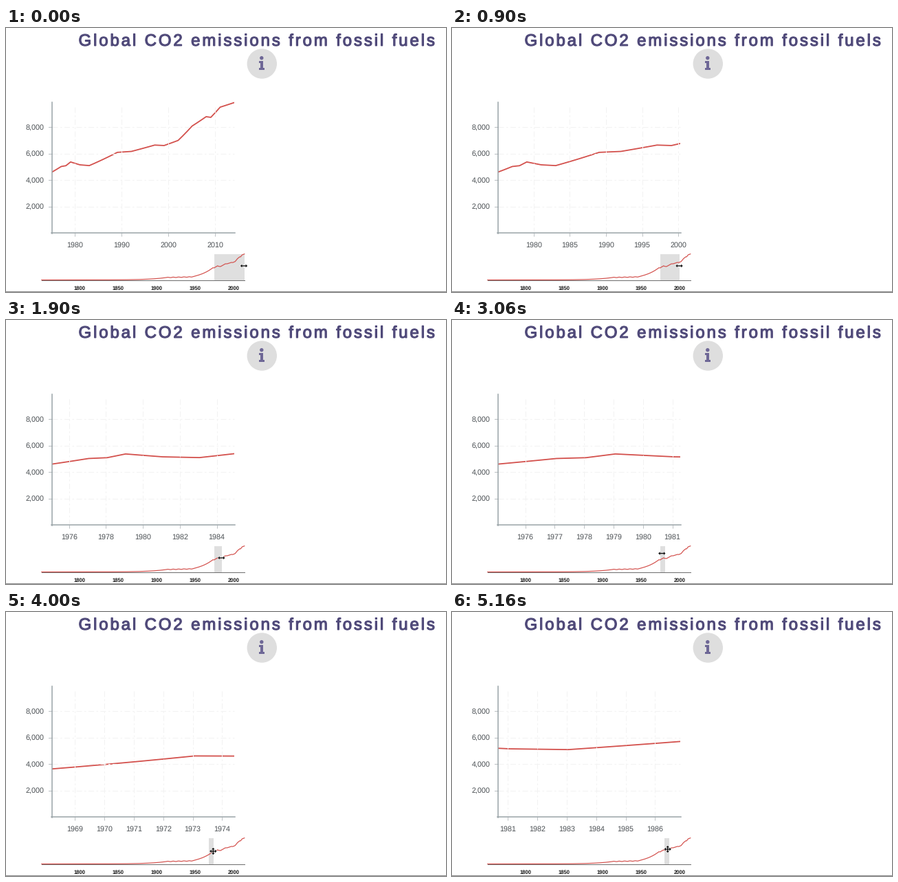
A matplotlib script for the animation above (5.18 s loop, 640x384 px).

```python
import numpy as np
import matplotlib.pyplot as plt
from matplotlib.animation import FuncAnimation
from matplotlib.collections import LineCollection
from matplotlib.patches import Circle, PathPatch, Polygon, Rectangle
from matplotlib.path import Path
from matplotlib.textpath import TextPath
from matplotlib.transforms import Affine2D

plt.rcParams["text.hinting"] = "none"

W, H, DPI = 640, 384, 100
STEP, FRAMES = 20, 259
PT = 72 / DPI  # points per pixel

FONT = "Liberation Sans"
PURPLE, INFO, RED = "#4f4979", "#6e6796", "#d3504c"
AXIS, TICK, GRID, LABEL = "#98a2a6", "#bcc1c4", "#f2f2f2", "#4a4f53"

LEFT, RIGHT, TOP, BASE = 66.8, 332.2, 108, 298.2
MINI_BASE, MINI_H = 366.5, 37.8

RESIZE_END, GRAB, TURN_BACK, END = 2140, 3350, 3980, 5160  # ms


def along(t, *keys):
    return np.interp(t, *zip(*keys))


def emissions(year):
    """Exponential growth between turning points, with interwar swings."""
    log_v = along(year, *((y, np.log(v)) for y, v in (
        (1751, 3), (1850, 54), (1913, 943), (1945, 1160), (1973, 4614),
        (1975, 4600), (1977, 5026), (1978, 5087), (1979, 5369), (1981, 5152),
        (1983, 5094), (1989, 6095), (1992, 6165), (1997, 6645), (1999, 6610),
        (2002, 6995), (2005, 8085), (2008, 8790), (2009, 8740), (2011, 9510),
        (2014, 9855))))
    swing = np.where((year > 1912) & (year < 1948), 80 * np.sin(0.9 * year), 0)
    return np.exp(log_v) + swing


calendar = np.arange(1751, 2015)
values = emissions(calendar)
years = calendar + 0.06


def value_y(v):
    return BASE - v * 0.01925


def mini_x(year):
    return 106.7 + (year - 1800) * 1.1215


def tick_step(span, count=5):
    raw = span / count
    step = 10 ** np.floor(np.log10(raw))
    err = step / raw
    for limit, factor in ((0.15, 10), (0.35, 5), (0.75, 2)):
        if err <= limit:
            return step * factor
    return step


def window(t):
    """Years at both ends of the brush: shrink, rest, then slide."""
    a = along(t, (GRAB, 1975.07), (TURN_BACK, 1968), (END, 1980.66))
    return a, a + along(t, (0, 39.03), (RESIZE_END, 6.2))


def pointer(t, x0, x1):
    if t < GRAB:
        handle = x1 - 0.8
        return (along(t, (2400, handle), (3000, 305.3), (3100, 305.3), (GRAB, x0 + 6)),
                along(t, (2400, 346), (3000, 339.5), (3100, 339.5), (GRAB, 348)))
    return (x0 + along(t, (TURN_BACK, 6), (END, 4.4)),
            along(t, (TURN_BACK, 348), (END, 345)))


def spaced_path(text, x, y, size, gap):
    """Outline of letter-spaced text with its baseline at y."""
    def outline(s):
        return TextPath((0, 0), s, size=size, prop={"family": FONT})

    bar = outline("|").get_extents().x1
    parts = []
    for i, ch in enumerate(text):
        if ch == " ":
            continue
        dx = outline(text[:i] + "|").get_extents().x1 - bar + i * gap
        parts.append(Affine2D().scale(1, -1).translate(x + dx, y).transform_path(outline(ch)))
    return Path.make_compound_path(*parts)


fig = plt.figure(figsize=(W / DPI, H / DPI), dpi=DPI, facecolor="white")
ax = fig.add_axes([0, 0, 1, 1])
ax.set_xlim(0, W)
ax.set_ylim(H, 0)
ax.axis("off")


def line(xs, ys, color, width, z=2, **kw):
    return ax.plot(xs, ys, color=color, lw=width * PT, zorder=z, **kw)[0]


def label(x, y, text, size, color, ha="center", weight="normal"):
    return ax.text(x, y, text, family=FONT, fontsize=size * PT, color=color,
                   ha=ha, va="center_baseline", weight=weight, zorder=5)


def shape(points, color, z=3, width=0.0):
    return ax.add_patch(Polygon(points, closed=True, fc=color, lw=width * PT,
                                ec=color if width else "none", zorder=z))


# heading and info badge
ax.add_patch(PathPatch(spaced_path("Global CO2 emissions from fossil fuels", 105.5, 25.8, 24, 2.87),
                       fc=PURPLE, ec=PURPLE, lw=1.2 * PT))
ax.add_patch(Circle((372.3, 52), 21.7, fc="#dedede", ec="none"))
ax.add_patch(Circle((371.8, 43.6), 2.7, fc=INFO, ec="none", zorder=3))
for x, y, w, h in ((368, 48.4, 6.3, 2.8), (369.8, 48.4, 4.5, 12), (367.6, 58.2, 8.8, 2.8)):
    ax.add_patch(Rectangle((x, y), w, h, fc=INFO, ec="none", zorder=3))

# main chart
GRID_DASH = (0, (8, 3.5, 2.5, 3.5))
for v in range(2000, 8001, 2000):
    y = value_y(v)
    line([LEFT, RIGHT], [y, y], GRID, 1, 4, ls=GRID_DASH)
    line([62, LEFT], [y, y], TICK, 1)
    label(55.2, y, f"{v:,}", 10.7, LABEL, "right")
line([LEFT, LEFT], [TOP, BASE + 0.7], AXIS, 1.5, 5)
line([LEFT - 0.7, RIGHT + 0.5], [BASE, BASE], AXIS, 1.5, 5)

curve = line([], [], RED, 1.8, 3, solid_joinstyle="round")
curve.set_clip_path(Rectangle((LEFT, TOP - 1), RIGHT - LEFT, BASE - TOP,
                              transform=ax.transData))
grid = ax.add_collection(LineCollection([], colors=GRID, lw=PT, linestyles=[GRID_DASH], zorder=4))
ticks = ax.add_collection(LineCollection([], colors=TICK, lw=PT, zorder=2))
names = [label(0, 315.4, "", 10.7, LABEL) for _ in range(9)]

# overview strip
brush = ax.add_patch(Rectangle((0, 328.7), 1, 37.8, fc="#dfdfdf", ec="none", zorder=1))
line(mini_x(years), MINI_BASE - values / 9855 * MINI_H, RED, 1.2, 3)
line([52, 347], [MINI_BASE + 0.3] * 2, "#555555", 1, 4, alpha=0.85)
for year in range(1800, 2001, 50):
    label(mini_x(year), 377.8, str(year), 7.7, "#1a1a1a", weight="bold")
line([0, W], [383.3, 383.3], "#8c8c8c", 1.1)

# pointers: two-way resize and four-way move, built from one arrow
ARM = np.array([(0.6, -0.6), (2.7, -0.6), (2.7, -2.1), (5, 0), (2.7, 2.1), (2.7, 0.6), (0.6, 0.6)])
QUARTER = np.array([[0, 1], [-1, 0]])
MOVE = np.vstack([ARM @ np.linalg.matrix_power(QUARTER, k) for k in range(4)])
RESIZE = np.vstack([ARM, -ARM])
cursor = shape(RESIZE, "#0c0c0c", 7, 0.2)
halo = shape(RESIZE, "white", 6, 1.4)


def draw(i):
    t = i * STEP
    a, b = window(t)
    scale = (RIGHT - LEFT) / (b - a)

    def chart_x(year):
        return LEFT + (year - a) * scale

    near = (years > a - 6) & (years < b + 6)
    curve.set_data(chart_x(years[near]), value_y(values[near]))

    step = tick_step(b - a)
    marks = np.arange(np.ceil(a / step) * step, b, step)
    xs = chart_x(marks)
    grid.set_segments([[(x, BASE), (x, 112)] for x in xs])
    ticks.set_segments([[(x, BASE), (x, 303.3)] for x in xs])
    for k, name in enumerate(names):
        shown = k < len(marks)
        name.set_visible(shown)
        if shown:
            name.set_x(xs[k])
            name.set_text(f"{marks[k]:.0f}")

    x0, x1 = mini_x(a), mini_x(b)
    brush.set_x(x0)
    brush.set_width(x1 - x0)
    pos = np.array(pointer(t, x0, x1))
    form = MOVE if t > 3180 else RESIZE
    for part in (cursor, halo):
        part.set_xy(form + pos)
    return []


anim = FuncAnimation(fig, draw, frames=FRAMES, interval=STEP, repeat=True,
                     repeat_delay=0, blit=False, init_func=lambda: draw(0))
plt.show()
```
